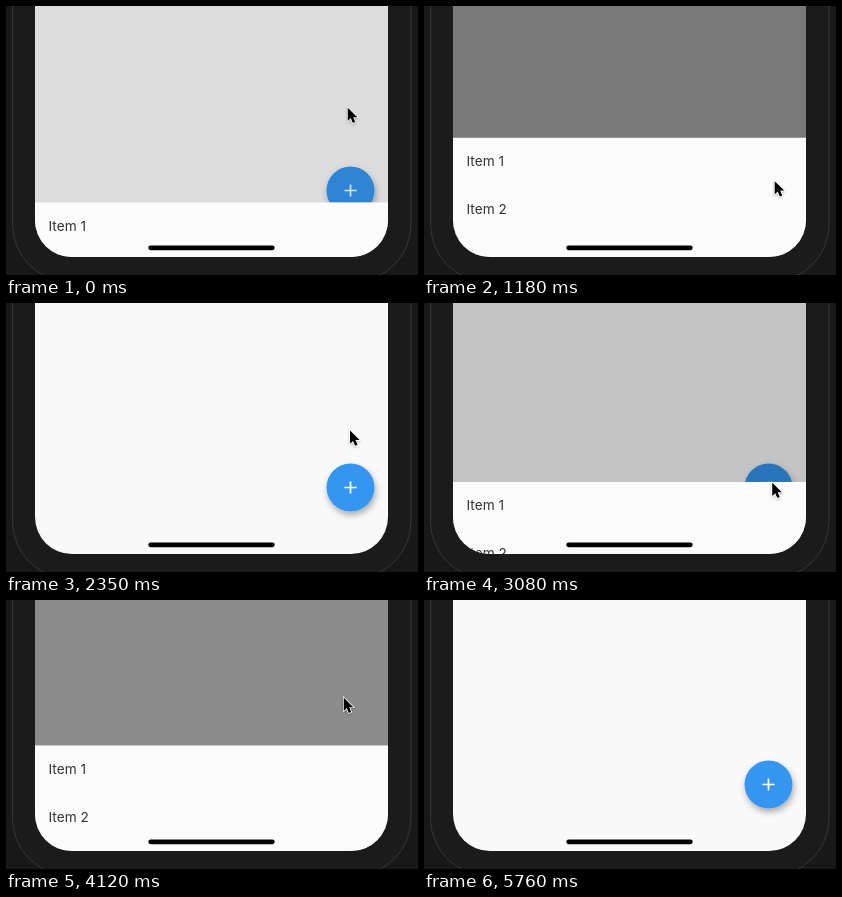
Write an HTML page that moves like this. It is 412 by 269 pixels and loops after 5.86 s.

```html
<!DOCTYPE html>
<html lang="en">
<head>
<meta charset="utf-8">
<title>Bottom sheet</title>
<style>
  html, body { margin: 0; width: 100%; height: 100%; overflow: hidden; background: #181818; }
  svg { display: block; width: 100vw; height: 100vh; }
  text { font: 13.65px Inter, "Liberation Sans", sans-serif; fill: #343434; }
</style>
</head>
<body>
<svg viewBox="0 0 412 269">
  <defs>
    <clipPath id="screen"><rect x="29" y="-60" width="353" height="311" rx="37"/></clipPath>
    <filter id="lift" x="-40%" y="-40%" width="180%" height="180%">
      <feDropShadow dx="1.3" dy="3.6" stdDeviation="3" flood-color="#000" flood-opacity=".32"/>
    </filter>
    <filter id="soft" x="-40%" y="-40%" width="180%" height="180%">
      <feDropShadow dx="0" dy="1" stdDeviation=".8" flood-color="#000" flood-opacity=".3"/>
    </filter>
  </defs>

  <rect width="412" height="269" fill="#181818"/>
  <rect x="6.5" y="-80" width="398.5" height="355.5" rx="57" fill="#1b1b1b" stroke="#373737"/>

  <g clip-path="url(#screen)">
    <rect x="29" width="353" height="251" fill="#f9f9f9"/>
    <circle cx="344.5" cy="184.5" r="24" fill="#3496f1" filter="url(#lift)"/>
    <path d="M338.4 184.5h12.2M344.5 178.4v12.2" stroke="#fff" stroke-width="1.7"/>
    <rect id="scrim" x="29" width="353" height="251"/>
    <g id="sheet">
      <rect x="29" width="353" height="130" fill="#fbfbfb"/>
      <text x="42.5" y="28.5">Item 1</text>
      <text x="42.5" y="76.3">Item 2</text>
    </g>
    <rect x="142.3" y="239.5" width="126.4" height="4.7" rx="2.35" fill="#000"/>
  </g>

  <g id="cursor" filter="url(#soft)">
    <path transform="scale(.94)" d="M.8 .8V14.8L4 11.8L6.2 17L8.8 15.9L6.6 10.8H11Z" stroke="#fff" stroke-width="1.5" paint-order="stroke"/>
  </g>
</svg>
<script>
const LOOP = 5860, TICK = 146.6;
const SCREEN_BOTTOM = 251, SHEET_HEIGHT = 124.6;
const OPEN_MS = 250, CLOSE_MS = 200;

// When the sheet starts to open and to close; the first visit wraps over the loop.
const visits = [
  { open: -1000, close: -167 },
  { open: 991, close: 1970 },
  { open: 3016, close: 4007 }
];

// Pointer moves between the backdrop and the button, then leaves the screen.
const home = { x: 341, y: 101 };
const moves = [
  { from: 100, to: 860, x: 351, y: 184 },
  { from: 1050, to: 1760, x: 338, y: 64 },
  { from: 2050, to: 2620, x: 348, y: 183 },
  { from: 2990, to: 3680, x: 337, y: 97 },
  { from: 4720, to: 5130, x: 377, y: 218 }
];
const POINTER_GONE = 5270;

const clamp = v => Math.min(1, Math.max(0, v));
const smooth = u => u * u * (3 - 2 * u);

function cubicBezier(x1, y1, x2, y2) {
  const at = (a, b, s) => 3 * a * s * (1 - s) ** 2 + 3 * b * s * s * (1 - s) + s ** 3;
  return x => {
    if (x <= 0 || x >= 1) return clamp(x);
    let lo = 0, hi = 1;
    for (let i = 0; i < 24; i++) {
      const mid = (lo + hi) / 2;
      if (at(x1, x2, mid) < x) lo = mid; else hi = mid;
    }
    return at(y1, y2, lo);
  };
}
const decelerate = cubicBezier(0, 0, .2, 1);
const ease = cubicBezier(.25, .1, .25, 1);

function openness(t) {
  const { open, close } = visits.findLast(visit => t >= visit.open);
  return clamp((t - open) / OPEN_MS) - clamp((t - close) / CLOSE_MS);
}

function pointerAt(t) {
  return moves.reduce((p, { from, to, x, y }) => {
    const u = smooth(clamp((t - from) / (to - from)));
    return { x: p.x + (x - p.x) * u, y: p.y + (y - p.y) * u };
  }, home);
}

const [scrim, sheet, cursor] = ["scrim", "sheet", "cursor"].map(id => document.getElementById(id));

function draw(time) {
  const t = Math.floor(time / TICK) * TICK;
  const progress = openness(t);
  const { x, y } = pointerAt(t);
  scrim.setAttribute("fill-opacity", .54 * ease(progress));
  sheet.setAttribute("transform", `translate(0 ${SCREEN_BOTTOM - SHEET_HEIGHT * decelerate(progress)})`);
  cursor.setAttribute("transform", `translate(${x} ${y})`);
  cursor.style.display = t < POINTER_GONE ? "" : "none";
}

const begin = performance.now();
function tick() {
  draw((performance.now() - begin) % LOOP);
  requestAnimationFrame(tick);
}
draw(0);
requestAnimationFrame(tick);
</script>
</body>
</html>
```
